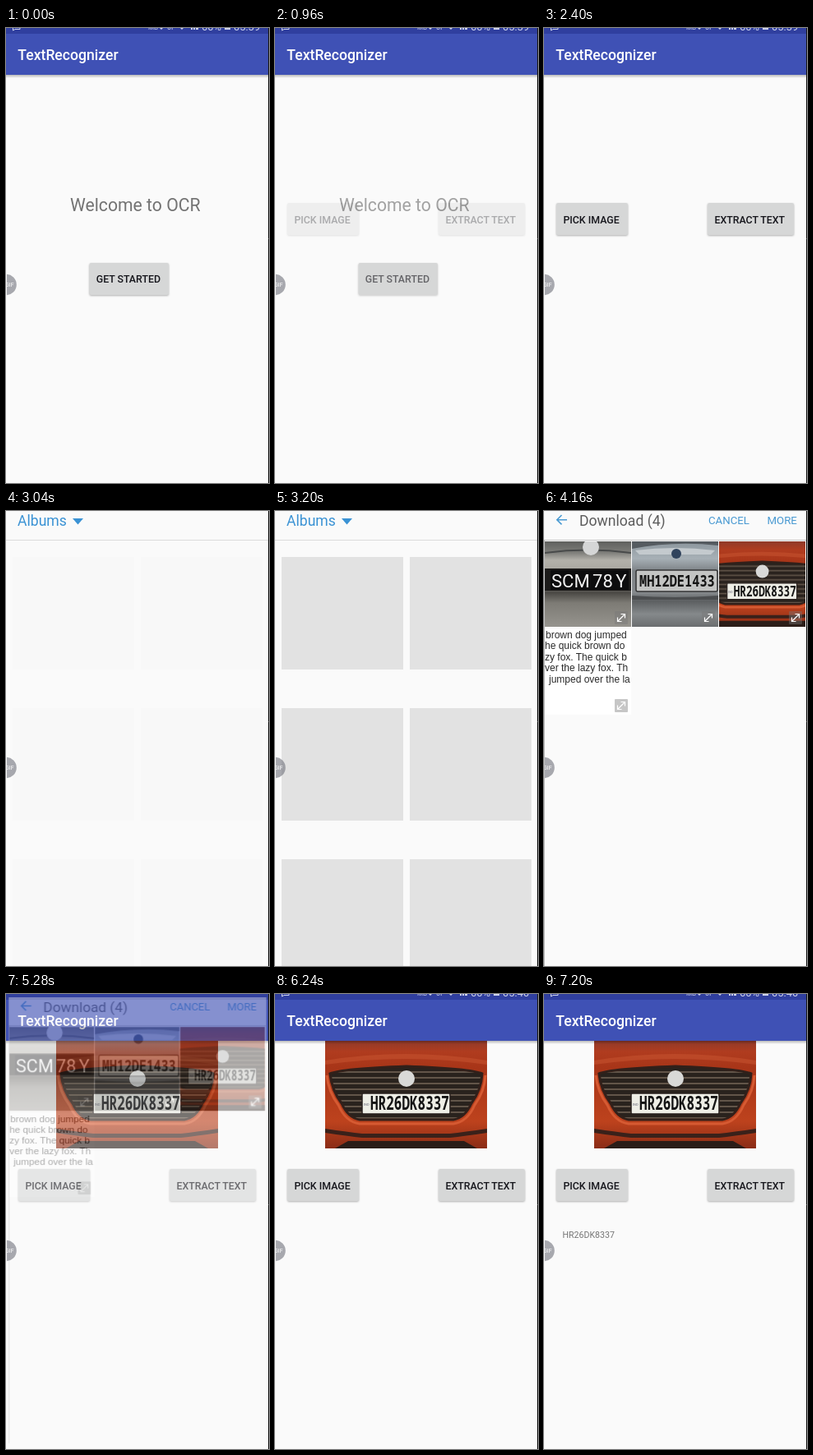
An HTML page for the animation above (9.6 s loop, 320x554 px).

```html
<!DOCTYPE html>
<html lang="en">
<head>
<meta charset="utf-8">
<title>Text recognizer demo</title>
<style>
  html, body { margin: 0; width: 100%; height: 100%; overflow: hidden; background: #fafafa; }
  svg { display: block; width: 100vw; height: 100vh; }
  text { font-family: Roboto, sans-serif; white-space: pre; }
  .label { font-size: 12.36px; font-weight: 500; fill: #16161c; }
  .button { fill: #d6d7d7; filter: drop-shadow(0 1px 1px rgba(0,0,0,.3)); }
  .title { font-size: 17.6px; }
  .action { font-size: 13.25px; fill: #4a9ad2; }
  .plate { font-family: "Noto Sans Mono", "Liberation Mono", monospace; font-weight: 700; fill: #151515; }
  .page text { font: 12px "Liberation Sans", Arial, sans-serif; fill: #2a2a2a; }
  .status { font-size: 13px; fill: #cfd4ee; }
  #gallery { transform-origin: 160px 200px; }
</style>
</head>
<body>
<svg viewBox="0 0 320 554" preserveAspectRatio="none">
  <defs>
    <linearGradient id="paint" x2="0" y2="1">
      <stop offset="0" stop-color="#8f3a2a"/><stop offset=".1" stop-color="#b03c1f"/>
      <stop offset=".25" stop-color="#a83518"/><stop offset=".75" stop-color="#bd421d"/>
      <stop offset="1" stop-color="#8a2c16"/>
    </linearGradient>
    <linearGradient id="silver" x2="0" y2="1">
      <stop offset="0" stop-color="#5f605e"/><stop offset=".13" stop-color="#7d7d79"/>
      <stop offset=".22" stop-color="#b3b1aa"/><stop offset=".5" stop-color="#9c9a93"/>
      <stop offset=".6" stop-color="#4a4844"/><stop offset=".72" stop-color="#7d7b75"/>
      <stop offset="1" stop-color="#96948e"/>
    </linearGradient>
    <linearGradient id="steel" x2="0" y2="1">
      <stop offset="0" stop-color="#8b959c"/><stop offset=".2" stop-color="#a7b0b6"/>
      <stop offset=".35" stop-color="#7c8185"/><stop offset=".6" stop-color="#85898c"/>
      <stop offset=".7" stop-color="#5c5f61"/><stop offset=".85" stop-color="#85898b"/>
      <stop offset="1" stop-color="#6a6d6f"/>
    </linearGradient>
    <linearGradient id="shade" x2="0" y2="1">
      <stop offset="0" stop-opacity=".26"/><stop offset="1" stop-opacity="0"/>
    </linearGradient>
    <pattern id="slats" width="8" height="7" patternUnits="userSpaceOnUse">
      <rect width="8" height="7" fill="#29221d"/><rect y="2" width="8" height="2" fill="#625549"/>
    </pattern>
    <clipPath id="photoBox"><rect width="197" height="131"/></clipPath>
    <clipPath id="tileBox"><rect width="105" height="104"/></clipPath>
    <clipPath id="screen"><rect x="1" width="318" height="554"/></clipPath>

    <g id="car" clip-path="url(#photoBox)">
      <rect width="197" height="131" fill="url(#paint)"/>
      <path d="M0 24Q98 8 197 24V29Q98 15 0 29Z" fill="#cf5c38" opacity=".4"/>
      <path d="M6 40Q20 34 99 31Q177 34 191 40Q190 60 178 76Q170 94 156 96H42Q28 94 20 76Q8 60 6 40Z"
            fill="url(#slats)" stroke="#32201a" stroke-width="3"/>
      <path d="M2 42Q4 62 16 78Q25 99 42 101H156Q173 99 182 78Q194 62 195 42" fill="none" stroke="#d65a32" stroke-width="3"/>
      <path d="M0 107Q28 111 45 113H152Q169 111 197 107V112Q169 116 152 118H45Q28 116 0 112Z" fill="#3a211a"/>
      <path d="M12 131L28 122H169L185 131Z" fill="#2b1d18"/>
      <circle cx="99" cy="46" r="10" fill="#d9d9d7"/>
      <rect x="45" y="64" width="107" height="25" rx="1.500" fill="#eeeee6" stroke="#29211e" stroke-width="1.500"/>
      <text x="47" y="79" font-size="4" fill="#667">IND</text>
      <text class="plate" font-size="16" transform="translate(55 84) scale(1 1.4)">HR26DK8337</text>
    </g>
    <g id="expand">
      <rect x="85" y="85" width="16" height="16" rx="1" fill="#777" opacity=".42"/>
      <path d="M89 97L97 89M92.500 88.500H97.500V93.500M88.500 92.500V97.500H93.500" fill="none" stroke="#fff" stroke-width="1.200"/>
    </g>
  </defs>

  <rect width="320" height="554" fill="#fafafa"/>

  <g id="home">
    <text x="78" y="223" font-size="21.200" fill="#737373">Welcome to OCR</text>
    <rect class="button" x="101.500" y="286" width="96.500" height="39" rx="2"/>
    <rect id="press" x="101.500" y="286" width="96.500" height="39" rx="2"/>
    <text class="label" x="109.800" y="310.400">GET STARTED</text>
  </g>

  <g id="picker">
    <rect y="57" width="320" height="497" fill="#fafafa"/>
    <rect class="button" x="15" y="213" width="87" height="39" rx="2"/>
    <text class="label" x="23.400" y="237.800">PICK IMAGE</text>
    <rect class="button" x="199" y="213" width="105" height="39" rx="2"/>
    <text class="label" x="207.400" y="237.800">EXTRACT TEXT</text>
    <use id="photo" href="#car" x="61" y="57"/>
    <text id="result" x="22.500" y="297" font-size="10.600" fill="#757575">HR26DK8337</text>
  </g>

  <g id="appBar">
    <rect y="57" width="320" height="4" fill="url(#shade)"/>
    <rect width="320" height="57" fill="#3f51b5"/>
    <rect width="320" height="7" fill="#303f9f"/>
    <text class="title" x="14.300" y="39" font-weight="500" fill="#fff">TextRecognizer</text>
    <g id="status" class="status">
      <path d="M8.500 0V3L11 1.500H17V0" fill="none" stroke="#cfd4ee"/>
      <text x="173" y="2" font-size="8">MB</text>
      <path d="M187 0H191L189 2ZM212 0H216L214 2ZM225 0H227V2H225ZM228 0H230V2H228ZM231 0H234V2H231ZM266 0H273V2H266Z"/>
      <text x="196" y="2" font-size="9">0F</text>
      <text x="238" y="3">60%</text>
      <text id="clockA" x="277" y="3">05:39</text>
      <text id="clockB" x="277" y="3">05:40</text>
    </g>
  </g>

  <g id="gallery">
    <rect width="320" height="554" fill="#fafafa"/>
    <path d="M0 35.500H320" stroke="#dcdcdc"/>
    <path id="edge" d="M0 35.500H320M.5 36V554" fill="none" stroke="#c2c2c2"/>
    <g id="albums" fill="#3a92d4">
      <text class="title" x="14" y="18">Albums</text>
      <path d="M81 9H94L87.500 16.500Z"/>
    </g>
    <g id="grid" fill="#e2e2e2"></g>
    <g id="download">
      <path d="M28 10.700H16M21.500 5L15.800 10.700L21.500 16.400" fill="none" stroke="#4a9ad2" stroke-width="1.600"/>
      <text class="title" x="43" y="18" fill="#5c5c5c">Download (4)</text>
      <text class="action" x="200" y="16">CANCEL</text>
      <text class="action" x="271.500" y="16">MORE</text>

      <g transform="translate(1 37)" clip-path="url(#tileBox)">
        <rect width="105" height="104" fill="url(#silver)"/>
        <path d="M0 14Q52 7 105 14" fill="none" stroke="#484a4a" stroke-width="2"/>
        <circle cx="56" cy="7" r="10" fill="#d5d6d6"/>
        <path d="M0 33H105V60H0Z" fill="#1c1b1a"/>
        <rect x="7" y="35" width="95" height="24" rx="1" fill="#0d0d0e"/>
        <text x="8" y="56" font-size="22" word-spacing="-2" fill="#f2f2f2">SCM 78 Y</text>
        <use href="#expand"/>
      </g>
      <g transform="translate(107 37)" clip-path="url(#tileBox)">
        <rect width="105" height="104" fill="url(#steel)"/>
        <path d="M0 0H105V5Q52 -1 0 9Z" fill="#555b60"/>
        <path d="M4 11Q52 5 101 11L96 16H9Z" fill="#c4cace"/>
        <path d="M0 66Q52 70 105 66V71H0Z" fill="#4b4d4f"/>
        <circle cx="54" cy="15" r="6" fill="#30435c"/>
        <rect x="5" y="35" width="99" height="26" rx="2" fill="#c3c4c3" stroke="#343536" stroke-width="1.500"/>
        <text class="plate" font-size="15.300" transform="translate(9 55) scale(1 1.3)">MH12DE1433</text>
        <use href="#expand"/>
      </g>
      <g transform="translate(213 37)" clip-path="url(#tileBox)">
        <use href="#car" transform="translate(-26 0) scale(.794)"/>
        <rect id="tap" width="105" height="104" fill="#000"/>
        <use href="#expand"/>
      </g>
      <g transform="translate(1 144)" clip-path="url(#tileBox)">
        <rect width="105" height="104" fill="#fff"/>
        <g class="page">
          <text x="1" y="11">brown dog jumped</text>
          <text x="0" y="24.400">he quick brown do</text>
          <text x="0" y="37.800">zy fox. The quick b</text>
          <text x="0" y="51.200">ver the lazy fox. Th</text>
          <text x="5" y="64.600">jumped over the la</text>
        </g>
        <use href="#expand"/>
      </g>
    </g>
  </g>

  <g clip-path="url(#screen)">
    <circle cy="312.500" r="12.800" fill="#70727c" opacity=".6"/>
    <text x="-1" y="315" font-size="7" fill="#fff">GIF</text>
  </g>
  <path d="M319.500 0V554" stroke="#161616"/>
</svg>
<script>
  const LOOP = 9600;
  const byId = id => document.getElementById(id);

  // Album placeholders: two columns, three rows.
  for (let i = 0; i < 6; i++) {
    const tile = document.createElementNS('http://www.w3.org/2000/svg', 'rect');
    const box = { x: i % 2 ? 164 : 8, y: 56 + (i >> 1) * 184, width: 148, height: 137 };
    for (const key in box) tile.setAttribute(key, box[key]);
    byId('grid').append(tile);
  }

  // Each step is [time in ms, value], held until the next step.
  function steps(id, property, table) {
    const frames = table.map(([time, value]) =>
      ({ offset: time / LOOP, [property]: value, easing: 'step-end' }));
    frames.push({ offset: 1, [property]: table[table.length - 1][1] });
    return byId(id).animate(frames, { duration: LOOP, iterations: Infinity });
  }

  const opacity = {
    press: [[0, 0], [640, .08], [800, .14], [960, .08], [1280, 0]],
    picker: [[0, 0], [960, .35], [1120, .85], [1280, 1]],
    photo: [[0, 0], [4960, 1]],
    result: [[0, 0], [7200, 1]],
    status: [[0, 1], [3040, 0], [5440, 1]],
    clockA: [[0, 1], [5120, 0]],
    clockB: [[0, 0], [5120, 1]],
    gallery: [[0, 0], [2880, .5], [3040, 1], [5120, .8], [5280, .38], [5440, .1], [5600, 0]],
    edge: [[0, 0], [3840, 1]],
    albums: [[0, 1], [4000, 0]],
    grid: [[0, 0], [3040, .07], [3200, 1], [3840, 0]],
    download: [[0, 0], [4000, .6], [4160, 1]],
    tap: [[0, 0], [4960, .2]]
  };
  const running = Object.entries(opacity).map(([id, table]) => steps(id, 'opacity', table));
  running.push(steps('gallery', 'transform',
    [[0, 'scale(1)'], [5120, 'scale(.99)'], [5280, 'scale(.98)'], [5440, 'scale(.97)']]));

  const start = document.timeline.currentTime;
  running.forEach(animation => animation.startTime = start);
</script>
</body>
</html>
```
